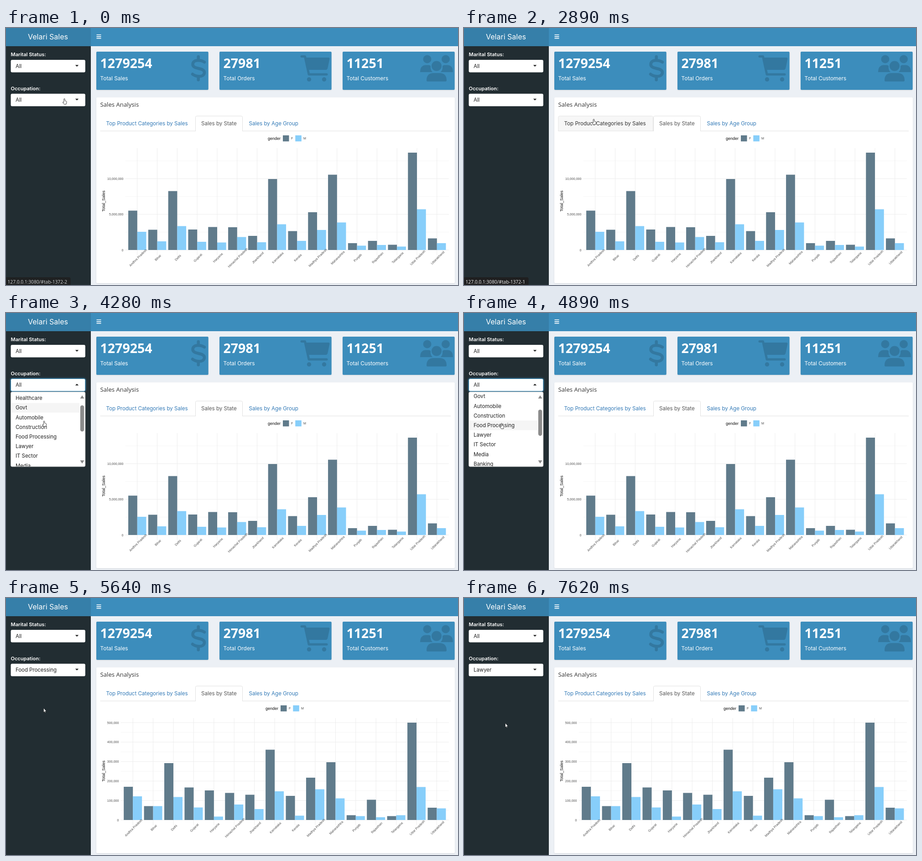
Animation of 991 by 565 pixels, one loop 8 s. Source, as an HTML page:

```html
<!DOCTYPE html>
<html lang="en">
<head>
<meta charset="utf-8">
<title>Sales dashboard</title>
<style>
  html, body { margin: 0; width: 100%; height: 100%; overflow: hidden; }
  svg { display: block; width: 991px; height: 565px; }
  text { font: 11.6px Inter, sans-serif; white-space: pre; }
  .label { font-size: 11px; font-weight: 600; fill: #fff; }
  .field { font-size: 11.4px; fill: #222; }
  .value { font: bold 28.5px "Noto Sans", sans-serif; fill: #fff; }
  .caption { font-size: 11.9px; fill: #fff; }
  .chart text { font: 7.1px "Liberation Sans", Arial, sans-serif; fill: #4d4d4d; }
  .chart .title { font-size: 9px; fill: #111; }
  .status { font: 10.2px "Open Sans", sans-serif; fill: #f1f1f1; }
  .shadow { filter: drop-shadow(0 1px 1px rgba(0, 0, 0, .1)); }
  .end { text-anchor: end; }
  .mid { text-anchor: middle; }
</style>
</head>
<body>
<svg id="stage" viewBox="0 0 991 565"></svg>
<script>
const LOOP = 8000;
const BLUE = '#3c8dbc', ICON = '#3378a0', FEMALE = '#607b8b', MALE = '#87cefa';
const ROW = 21.2, FIRST_ROW = 190;

const states = ['Andhra Pradesh', 'Bihar', 'Delhi', 'Gujarat', 'Haryana', 'Himachal Pradesh', 'Jharkhand',
  'Karnataka', 'Kerala', 'Madhya Pradesh', 'Maharashtra', 'Punjab', 'Rajasthan', 'Telangana',
  'Uttar Pradesh', 'Uttarakhand'];
const jobs = ['All', 'Healthcare', 'Govt', 'Automobile', 'Construction', 'Food Processing', 'Lawyer',
  'IT Sector', 'Media', 'Banking', 'Retail', 'Hospitality', 'Aviation', 'Textile', 'Agriculture', 'Chemical'];

const rect = (x, y, w, h, fill, extra = '') =>
  `<rect x="${x}" y="${y}" width="${w}" height="${h}" fill="${fill}" ${extra}/>`;
const text = (x, y, str, cls = '', extra = '') =>
  `<text x="${x}" y="${y}" class="${cls}" ${extra}>${str}</text>`;
const path = (d, extra) => `<path d="${d}" ${extra}/>`;
const circle = (x, y, r) => `<circle cx="${x}" cy="${y}" r="${r}"/>`;
const line = (x1, y1, x2, y2, width, color = '#ebebeb') =>
  path(`M${x1} ${y1}L${x2} ${y2}`, `stroke="${color}" stroke-width="${width}"`);

// Bar heights are in pixels above the zero line.
const allSales = {
  left: 261.5, step: 43.8, tick: 5e6, tickHeight: 78.4, ticks: 2, legend: 574,
  female: [86.5, 44.5, 129.5, 45, 50.5, 50, 31, 156, 41.5, 83, 165.5, 15, 20, 11.5, 214, 25.5],
  male: [40, 19, 52.5, 18, 16.5, 28.5, 17, 56.5, 20, 44, 60.5, 9.5, 11, 7.5, 89.5, 15]
};
const foodSales = {
  left: 251.5, step: 44.42, tick: 1e5, tickHeight: 42.8, ticks: 5, legend: 569,
  female: [73, 30.5, 125, 71.5, 65, 59.5, 55.5, 154.5, 53, 93, 127, 10.5, 44.5, 8.5, 214, 27],
  male: [52, 30.5, 50.5, 27.5, 7.5, 34, 24, 63, 9.5, 67.5, 47.5, 8.5, 6, 10.5, 72.5, 25.5]
};

function chart(id, { left, step, tick, tickHeight, ticks, legend, female, male }) {
  const base = 488, top = 264, right = 971, bar = step * .45;
  let grid = '', bars = '', labels = '';
  for (let n = 0; n <= ticks; n++) {
    const y = base - n * tickHeight, half = y - tickHeight / 2;
    grid += line(left, y, right, y, .9);
    if (half > top) grid += line(left, half, right, half, .45);
    labels += text(left - 4, y + 2.5, (n * tick).toLocaleString('en-US'), 'end');
  }
  states.forEach((name, i) => {
    const x = left + step * (i + .6);
    grid += line(x, top, x, 499, .9);
    bars += rect(x - bar, base - female[i], bar, female[i], FEMALE) + rect(x, base - male[i], bar, male[i], MALE);
    labels += text(0, 2.5, name, 'mid', `transform="translate(${x + 1.5} 505) rotate(-45)"`);
  });
  labels += text(0, 0, 'Total_Sales', 'title mid', 'transform="translate(217 380.5) rotate(-90)"')
    + text(legend, 245.6, 'gender', 'title')
    + rect(legend + 33, 236, 13.5, 13.3, FEMALE) + text(legend + 51, 245, 'F')
    + rect(legend + 60.3, 236, 13.5, 13.3, MALE) + text(legend + 78, 245, 'M');
  return `<g id="${id}" class="chart">${grid}${bars}${labels}</g>`;
}

const infoBox = (x, value, caption) =>
  rect(x, 52, 245.7, 84, BLUE, 'rx="2" class="shadow"')
  + text(x + 8.5, 88, value, 'value') + text(x + 8.5, 115, caption, 'caption');

const icons = `<g fill="${ICON}">`
  + path('M421.7 63V70M421.7 107V114M435 75C428 70.5 409.5 68 409.5 80C409.5 92 435 86 435 98C434 110 416 107 409 101.500',
    `fill="none" stroke="${ICON}" stroke-width="6.5" stroke-linecap="round"`)
  + path('M648 62.500H655.500L664 102H703', `fill="none" stroke="${ICON}" stroke-width="5" stroke-linecap="round" stroke-linejoin="round"`)
  + path('M655 65H707Q710 65 709.500 68L705 89Q704 92 701 92H661Z', '')
  + circle(664.5, 113, 4.7) + circle(697.5, 113, 4.7)
  + circle(923.5, 68.5, 9) + circle(964, 68.5, 9) + circle(944, 83.5, 11)
  + path('M908 97Q908 82 920 81.500H927Q930 82 931 83.500Q930 92 935 97ZM980 97Q980 82 968 81.500H961Q958 82 957 83.500Q958 92 953 97Z', '')
  + path('M922 115Q922 99 938 99H950Q966 99 966 115Q966 117.500 964 117.500H924Q922 117.500 922 115Z', '')
  + '</g>';

const select = (y, label, caret, id) =>
  text(10.5, y - 8, label, 'label')
  + rect(10.5, y, 163.3, 27.5, '#fff', `rx="3" id="${id}Box"`)
  + text(21, y + 17.5, 'All', 'field', `id="${id}Text"`)
  + path(caret, `fill="#222" id="${id}Caret"`);

const CARET_DOWN = 'M151.800 155.500H159.200L155.500 159.300Z';
const CARET_UP = 'M151.800 159.300H159.200L155.500 155.500Z';

const dropdown = '<g id="dropdown">'
  + rect(10.5, 173.5, 163.3, 164.3, '#fff', 'rx="3" stroke="#ccc" stroke-width=".8"')
  + '<clipPath id="listClip"><rect x="11" y="174" width="150" height="163.3"/></clipPath>'
  + '<g clip-path="url(#listClip)"><g id="list">'
  + rect(11, FIRST_ROW - ROW / 2, 150, ROW, '#f5f5f5', 'id="highlight"')
  + jobs.map((job, i) => text(21, FIRST_ROW + 4 + i * ROW, job, 'field')).join('') + '</g></g>'
  + path('M162.500 188L167 181L171.500 188ZM162.500 324H171.500L167 331Z', 'fill="#8b8b8b"')
  + rect(162.8, 194, 8.4, 57.5, '#8b8b8b', 'rx="4.2" id="thumb"') + '</g>';

const cursors =
  path('M-1.2 7.500V1Q0 -.4 1.200 1V5L4.300 6Q5.200 6.300 5 8L4 12.500H-.8L-3.800 8.400Q-3.500 6.800 -1.200 8.600Z',
    'id="hand" fill="#fff" stroke="#333" stroke-width=".9"')
  + path('M0 0V9.200L2 7.400L3.300 10.300L4.600 9.700L3.400 6.900H6Z', 'id="arrow" fill="#fff" stroke="#111" stroke-width=".6"')
  + path('M-2.500 -5H-.6L0 -4.500L.6 -5H2.500M0 -4.500V4.500M-2.500 5H-.6L0 4.500L.6 5H2.500',
    'id="beam" fill="none" stroke="#222" stroke-width=".9"');

const $ = id => document.getElementById(id);

$('stage').innerHTML =
  rect(0, 0, 991, 565, '#ecf0f5') + rect(0, 0, 991, 40, BLUE)
  + rect(0, 0, 186, 40, '#367fa9') + rect(0, 40, 186, 525, '#222d32')
  + text(92, 24.5, 'Velari Sales', 'mid', 'fill="#fff" style="font-size:16px"')
  + path('M198.500 15H208.500M198.500 18.800H208.500M198.500 22.600H208.500', 'stroke="#fff" stroke-width="1.7"')
  + infoBox(198, '1279254', 'Total Sales') + infoBox(468, '27981', 'Total Orders')
  + infoBox(738, '11251', 'Total Customers') + icons
  + rect(198, 152.5, 786, 408.5, '#fff', 'rx="2.500" class="shadow"')
  + text(206.5, 173, 'Sales Analysis', '', 'fill="#333" style="font:13.200px Open Sans,sans-serif"')
  + line(206.5, 226.4, 975, 226.4, .9, '#ddd')
  + path('M206.800 226.400V196.500Q206.800 193.500 209.800 193.500H411.500Q414.500 193.500 414.500 196.500V226.400Z',
    'id="tabHover" fill="#f7f7f7" stroke="#e4e4e4" stroke-width=".9"')
  + path('M415.500 227V196.500Q415.500 193.500 418.500 193.500H515.500Q518.500 193.500 518.500 196.500V227',
    'fill="#fff" stroke="#ddd" stroke-width=".9"')
  + text(219.5, 214, 'Top Product Categories by Sales', '', 'id="tabText"')
  + text(428, 214, 'Sales by State', '', 'fill="#555"')
  + text(532.5, 214, 'Sales by Age Group', '', 'fill="#337ab7"')
  + chart('allChart', allSales) + chart('foodChart', foodSales)
  + select(70, 'Marital Status:', 'M151.800 81.300H159.200L155.500 85.100Z', 'marital')
  + select(144.5, 'Occupation:', CARET_DOWN, 'job')
  + dropdown
  + '<g id="status">' + path('M0 548H138Q141.500 548 141.500 551.500V565H0Z', 'fill="#1f1f20"')
  + text(3.5, 562, '', 'status', 'id="statusText"') + '</g>'
  + `<g id="cursor">${cursors}</g>`;

// Keys are [time, ...values]; moves ease between neighbouring keys.
const pointerKeys = [[0, 128, 155], [1490, 128, 155], [1520, 130, 154.5], [2050, 445, 199], [2510, 445, 199],
  [2630, 290, 200], [2860, 290, 200], [2890, 284.5, 200], [3280, 92, 159], [3740, 92, 159], [4080, 83.5, 237],
  [4850, 83.5, 237], [4890, 82.5, 242], [6170, 82.5, 242], [6600, 112.5, 164], [6850, 112.5, 164],
  [6960, 108, 160], [7030, 108, 160], [7230, 90.5, 275], [LOOP, 90.5, 275]];
const scrollKeys = [[0, 0], [4260, 0], [4280, 24], [4600, 49], [LOOP, 49]];
const statusKeys = [[0, .85], [69, .85], [70, 1], [3740, 1], [3900, 0], [LOOP, 0]];
const fadeKeys = [[0, 1], [5420, 1], [5500, .6], [5570, .38], [5639, .32], [5640, 1], [LOOP, 1]];

// Steps hold a value from their start time on.
const shapeSteps = [[0, 'hand'], [4960, 'arrow'], [6480, 'beam'], [6850, 'hand'], [7560, 'arrow']];
const jobSteps = [[0, 'All'], [4960, 'Food Processing'], [7560, 'Lawyer']];
const linkSteps = [[0, 2], [1760, 1], [2510, 2], [2890, 1]];
const highlightSteps = [[0, 0], [3950, 1], [4030, 2], [4850, 5], [7200, 6]];

const at = (steps, t) => steps.filter(s => s[0] <= t).pop()[1];

function tween(keys, t) {
  const i = keys.findIndex(k => k[0] > t), a = keys[i - 1], b = keys[i];
  const u = (t - a[0]) / (b[0] - a[0]), eased = u * u * (3 - 2 * u);
  return a.slice(1).map((v, j) => v + (b[j + 1] - v) * eased);
}

const set = (id, attrs) => Object.entries(attrs).forEach(([key, value]) => $(id).setAttribute(key, value));
const show = (id, visible) => { $(id).style.display = visible ? '' : 'none'; };
const within = (t, from, to) => t >= from && t < to;

function draw(t) {
  const [x, y] = tween(pointerKeys, t), [scroll] = tween(scrollKeys, t);
  const open = within(t, 3450, 4960) || within(t, 6890, 7560);
  const hover = within(t, 1760, 2000) || within(t, 2890, 3030);

  set('cursor', { transform: `translate(${x} ${y})` });
  for (const shape of ['hand', 'arrow', 'beam']) show(shape, shape === at(shapeSteps, t));

  show('tabHover', hover);
  set('tabText', { fill: hover ? '#333' : '#337ab7' });
  $('statusText').textContent = `127.0.0.1:3080/#tab-1372-${at(linkSteps, t)}`;
  set('status', { opacity: tween(statusKeys, t)[0] });

  show('dropdown', open);
  set('list', { transform: `translate(0 ${-scroll})` });
  set('highlight', { y: FIRST_ROW + (at(highlightSteps, t) - .5) * ROW });
  set('thumb', { y: 194 + scroll * .375 });
  set('jobCaret', { d: open ? CARET_UP : CARET_DOWN });
  $('jobText').textContent = at(jobSteps, t);
  set('jobBox', { stroke: open ? BLUE : 'none' });
  $('jobBox').style.filter = open ? 'drop-shadow(0 0 2px rgba(60,141,188,.9))' : '';

  show('allChart', t < 5640);
  show('foodChart', t >= 5640);
  set('allChart', { opacity: tween(fadeKeys, t)[0] });
}

function frame() {
  draw(performance.now() % LOOP);
  requestAnimationFrame(frame);
}
frame();
</script>
</body>
</html>
```
